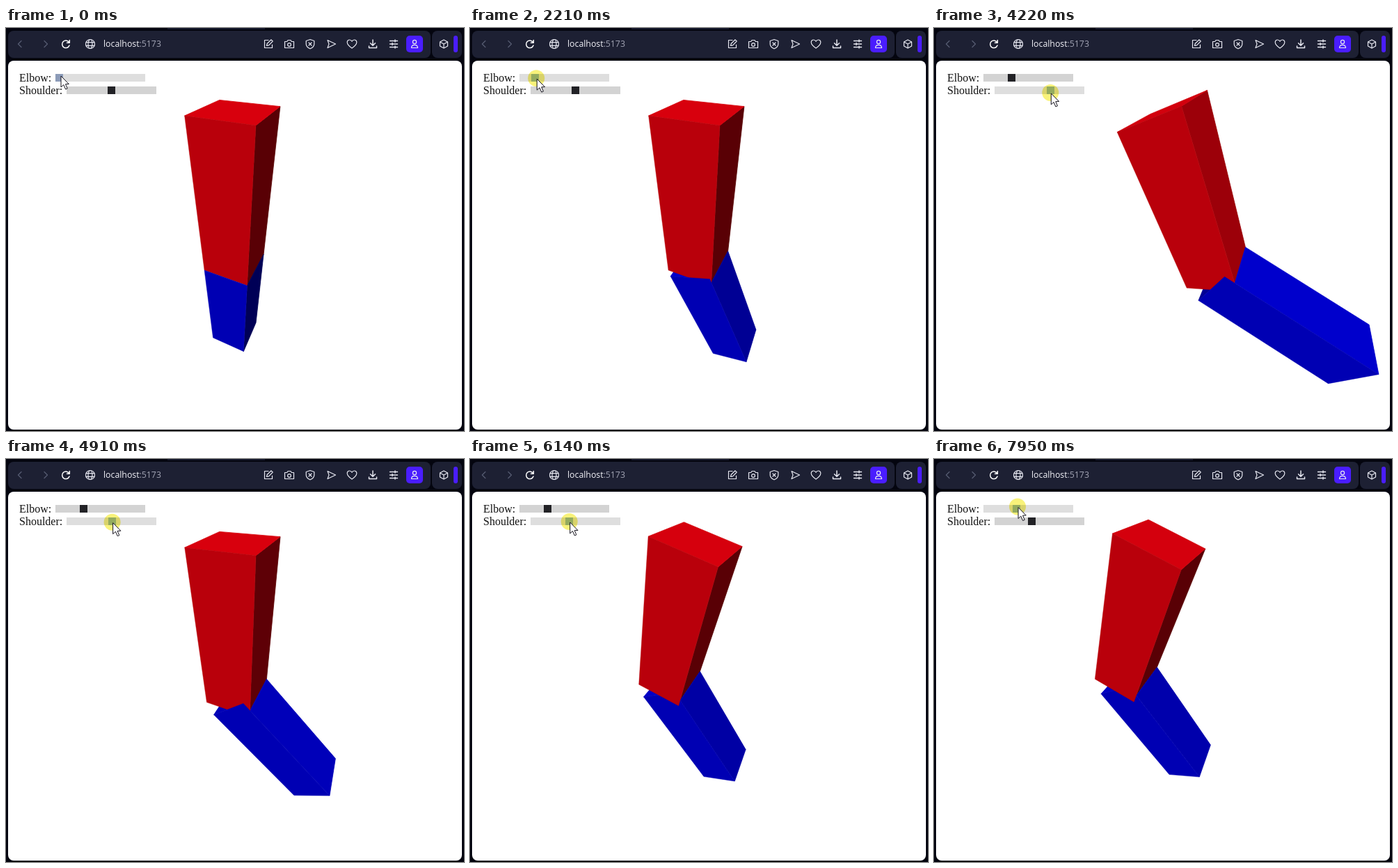
An HTML page with a canvas that plays this animation: 658 by 579 pixels, repeating every 8 s.

```html
<!DOCTYPE html>
<html lang="en">
<head>
<meta charset="utf-8">
<title>Robot arm</title>
<style>
  html, body { margin: 0; width: 100%; height: 100%; overflow: hidden; background: #04050f; }
  #stage { position: relative; width: 658px; height: 579px; overflow: hidden; }
  #stage > * { position: absolute; }
  .tab { left: 232px; top: 0; width: 140px; height: 2px; background: #14172a; }
  .bar { top: 4px; height: 39px; border-radius: 8px; background: #1d2033; }
  .page { left: 3px; top: 47px; width: 652px; height: 530px; border-radius: 8px; background: #fff; }
  .url { left: 140px; top: 14px; font: 12.3px/18px "Open Sans", "Noto Sans", sans-serif; color: #f4f4fa; white-space: nowrap; }
  .url span { color: #a2a4b4; }
  .label { left: 19px; font: 16px/18px "Liberation Serif", "Times New Roman", serif; color: #111; }
  svg, canvas { left: 0; top: 0; }
</style>
</head>
<body>
<div id="stage">
  <div class="tab"></div>
  <div class="bar" style="left:3px;width:607px"></div>
  <div class="bar" style="left:612px;width:43px"></div>
  <div class="page"></div>
  <svg width="658" height="46" fill="none" stroke="#e6e7f0" stroke-width="1.2" stroke-linecap="round" stroke-linejoin="round">
    <g stroke="#555a70" stroke-width="1.4">
      <path d="M22 18.500l-4.500 4.500 4.500 4.500"/>
      <path d="M55 18.500l4.500 4.500-4.500 4.500"/>
    </g>
    <path stroke="#fff" stroke-width="1.5" d="M90.500 20.500A5.300 5.300 0 1 0 91 25M91.300 17.500v3.800h-3.800"/>
    <g transform="translate(121 23)">
      <circle r="6.500"/><ellipse rx="3" ry="6.500"/><path d="M-6 -2.300H6M-6 2.300H6"/>
    </g>
    <g transform="translate(377 23)">
      <path d="M0 -5.500H-5.500V5.500H5.500V1M-2.500 2.500L-1.800 -.500 4 -6.200 6.200 -4 .500 1.800z"/>
    </g>
    <g transform="translate(407 23)">
      <path d="M-6.500 -3.500H-3.300L-2 -5.500H2L3.300 -3.500H6.500V5.500H-6.500z"/><circle cy="1" r="2.400"/>
    </g>
    <g transform="translate(437 23)">
      <path d="M0 -6.500L5.800 -4.500V0C5.800 3.500 3 5.500 0 6.800C-3 5.500 -5.800 3.500 -5.800 0V-4.500zM-2 -2L2 2M2 -2L-2 2"/>
    </g>
    <path d="M462 17.500L473.500 23 462 28.500 464 23z"/>
    <path d="M497 29C487 22.500 490 17 493.500 17Q496 17 497 19.200Q498 17 500.500 17C504 17 507 22.500 497 29z"/>
    <path stroke-width="1.500" d="M527 17v8M523.500 21.800l3.500 3.500 3.500-3.500M521.500 26v2.500h11V26"/>
    <path stroke-width="1.400" d="M551.500 18.500h11M551.500 23h11M551.500 27.500h11M559 17v3M555 21.500v3M559 26v3"/>
    <rect x="575" y="11" width="24" height="24" rx="5" fill="#4a1dff" stroke="none"/>
    <circle cx="587" cy="20" r="2.600"/>
    <path d="M582.500 28.500Q582.500 24.300 587 24.300Q591.500 24.300 591.500 28.500z"/>
    <path d="M629 17l5.500 3v6l-5.500 3-5.500-3v-6zM623.500 20l5.500 3 5.500-3M629 23v6"/>
    <rect x="643" y="11" width="6" height="24" rx="3" fill="#4a1dff" stroke="none"/>
  </svg>
  <div class="url">localhost<span>:5173</span></div>
  <div class="label" style="top:63px">Elbow:</div>
  <div class="label" style="top:81px">Shoulder:</div>
  <canvas id="view" width="658" height="579"></canvas>
</div>
<script>
const LOOP = 8000, TICK = 70, RAD = Math.PI / 180;
const ctx = document.getElementById('view').getContext('2d');
const lerp = (a, b, p) => a + (b - a) * p;

// zero: thumb offset at 0 deg; scale: px per deg; slow: how much a drag slows down; grab: pointer offset on the thumb
const SLIDERS = {
  elbow: { x: 71, y: 66, zero: 0, scale: 118 / 150, slow: 0, grab: 2.5 },
  shoulder: { x: 87, y: 84, zero: 59.4, scale: 118 / 180, slow: 0.4, grab: 1 }
};

// slider, start ms, end ms, pointer y, angle; without an angle the pointer only travels to the slider
const DRAGS = [
  ['elbow', 340, 1520, 73.5, 61.5],
  ['elbow', 1720, 2420, 73, 7],
  ['elbow', 2680, 3100, 78.5, 44.6],
  ['shoulder', 3250, 3390, 98],
  ['shoulder', 3590, 4570, 92, 31],
  ['shoulder', 4770, 5470, 91, -54],
  ['shoulder', 5670, 6760, 91, 24.5],
  ['shoulder', 6830, 7250, 91, -18],
  ['elbow', 7320, 7390, 77],
  ['elbow', 7465, 7540, 76, 51],
  ['elbow', 7810, 7950, 69.5, 53.4]
];

const thumbLeft = (s, name) => {
  const { x, zero, scale } = SLIDERS[name];
  return x + zero + scale * s[name];
};
const gripX = (s, name) => thumbLeft(s, name) + 5.5 + SLIDERS[name].grab;

function stateAt(t) {
  const s = { elbow: 0, shoulder: 0, y: 69, hover: 'elbow', press: false };
  s.x = gripX(s, 'elbow');
  for (const [name, start, end, y, angle] of DRAGS) {
    if (t < start) break;
    const n = Math.round((end - start) / TICK) + 1;
    const k = Math.floor((t - start) * (n - 1) / (end - start) + 1e-6) + 1;
    const p = Math.min(1, k / n);
    s.y = lerp(s.y, y, p);
    s.press = angle !== undefined;
    if (s.press) {
      const { slow } = SLIDERS[name];
      s[name] = lerp(s[name], angle, p * (1 + slow - slow * p));
      s.x = gripX(s, name);
      s.hover = name;
    } else {
      s.x = lerp(s.x, gripX(s, name), p);
      s.hover = '';
    }
  }
  return s;
}

// Camera: shoulder pivot is the world origin, half the arm width is the unit.
const FOCAL = 345.4, PIVOT = { y: -3.732, z: 6.68 }, EYE = [3.09, 1.74];
const UPPER = 6.066, FORE = 6.084;
const [sy, cy] = [Math.sin(24.5 * RAD), Math.cos(24.5 * RAD)];
const [sp, cp] = [Math.sin(42.35 * RAD), Math.cos(42.35 * RAD)];

function project([x, y], z) {
  const ahead = -sy * x - cy * z;
  const depth = PIVOT.z + cp * ahead - sp * y;
  return [
    329 + FOCAL * (cy * x - sy * z) / depth,
    312 + FOCAL * (PIVOT.y - sp * ahead - cp * y) / depth
  ];
}

function makeBox(origin, deg, len, color) {
  const s = Math.sin(deg * RAD), c = Math.cos(deg * RAD);
  const toWorld = (x, y) => [origin[0] + c * x - s * y, origin[1] + s * x + c * y];
  const toLocal = ([x, y]) => {
    const dx = x - origin[0], dy = y - origin[1];
    return [c * dx + s * dy, c * dy - s * dx];
  };
  const corners = [toWorld(-1, 0), toWorld(-1, -len), toWorld(1, -len), toWorld(1, 0)];
  return { corners, toLocal, len, color, end: toWorld(0, -len) };
}

// Lambert shading in linear light, then gamma.
function shade(color, ny, nz) {
  const lin = (0.1 + 0.59 * Math.max(0, ny) + 0.385 * nz) * (color === 'red' ? 1 : 0.93);
  const v = Math.round(255 * (1.055 * lin ** (1 / 2.4) - 0.055));
  return color === 'red' ? `rgb(${v},0,${Math.round(v * 0.06)})` : `rgb(0,0,${v})`;
}

function fillPoly(points, color, seam) {
  ctx.beginPath();
  points.forEach(p => ctx.lineTo(...p));
  ctx.closePath();
  ctx.fillStyle = ctx.strokeStyle = color;
  ctx.lineWidth = seam;
  ctx.fill();
  ctx.stroke();
}

// Part of segment a-b that lies inside the box, as [from, to].
function insideSpan(a, b, box) {
  const p = box.toLocal(a), q = box.toLocal(b);
  const low = [-1, -box.len], high = [1, 0], eps = 1e-6;
  let from = 0, to = 1;
  for (const i of [0, 1]) {
    const d = q[i] - p[i];
    if (Math.abs(d) < eps) {
      if (p[i] < low[i] - eps || p[i] > high[i] + eps) return [1, 1];
      continue;
    }
    const t0 = (low[i] - p[i]) / d, t1 = (high[i] - p[i]) / d;
    from = Math.max(from, Math.min(t0, t1));
    to = Math.min(to, Math.max(t0, t1));
  }
  return from < to ? [from, to] : [1, 1];
}

function drawSides(box, other) {
  box.corners.forEach((a, i) => {
    const b = box.corners[(i + 1) % 4];
    const dx = b[0] - a[0], dy = b[1] - a[1], len = Math.hypot(dx, dy);
    const nx = dy / len, ny = -dx / len;
    if ((EYE[0] - a[0]) * nx + (EYE[1] - a[1]) * ny <= 0) return;
    const at = t => [a[0] + dx * t, a[1] + dy * t];
    const [from, to] = insideSpan(a, b, other);
    for (const [s, e] of [[0, from], [to, 1]]) {
      if (e - s < 1e-4) continue;
      const p = at(s), q = at(e);
      fillPoly([project(p, 1), project(q, 1), project(q, -1), project(p, -1)], shade(box.color, ny, 0), 0.8);
    }
  });
}

function drawFront(box) {
  fillPoly(box.corners.map(p => project(p, 1)), shade(box.color, 0, 1), 0.4);
}

function drawArm({ elbow, shoulder }) {
  const upper = makeBox([0, 0], shoulder, UPPER, 'red');
  const fore = makeBox(upper.end, shoulder + elbow, FORE, 'blue');
  drawSides(upper, fore);
  drawSides(fore, upper);
  // The coplanar front faces overlap at the joint.
  const fronts = shoulder > -5 ? [upper, fore] : [fore, upper];
  fronts.forEach(drawFront);
}

function drawSlider(s, name) {
  const { x, y } = SLIDERS[name], hover = s.hover === name;
  ctx.fillStyle = hover ? '#dedede' : '#d3d3d3';
  ctx.fillRect(x, y, 129, 11);
  ctx.fillStyle = !hover ? '#222226' : s.press ? '#98b4c4' : '#8c9bb8';
  ctx.fillRect(Math.round(thumbLeft(s, name)), y, 11, 11);
}

function drawPointer({ x, y, press }) {
  if (press) {
    ctx.globalCompositeOperation = 'multiply';
    ctx.fillStyle = '#f8f27a';
    ctx.beginPath();
    ctx.arc(x - 1, y - 1, 12, 0, 7);
    ctx.fill();
    ctx.globalCompositeOperation = 'source-over';
  }
  const arrow = [[0, 0], [0, 16], [3.8, 12.6], [6.6, 19], [9.2, 17.9], [6.5, 11.7], [11.3, 11.5]];
  ctx.beginPath();
  arrow.forEach(([dx, dy]) => ctx.lineTo(x + dx, y + dy));
  ctx.closePath();
  ctx.fillStyle = '#fff';
  ctx.strokeStyle = '#14121c';
  ctx.lineWidth = 1;
  ctx.fill();
  ctx.stroke();
}

function draw(t) {
  const s = stateAt(t);
  ctx.clearRect(0, 0, 658, 579);
  ctx.save();
  ctx.beginPath();
  ctx.rect(3, 47, 652, 530);
  ctx.clip();
  drawArm(s);
  drawSlider(s, 'elbow');
  drawSlider(s, 'shoulder');
  drawPointer(s);
  ctx.restore();
}

const began = performance.now();
function loop() {
  draw((performance.now() - began) % LOOP);
  requestAnimationFrame(loop);
}
draw(0);
requestAnimationFrame(loop);
</script>
</body>
</html>
```
